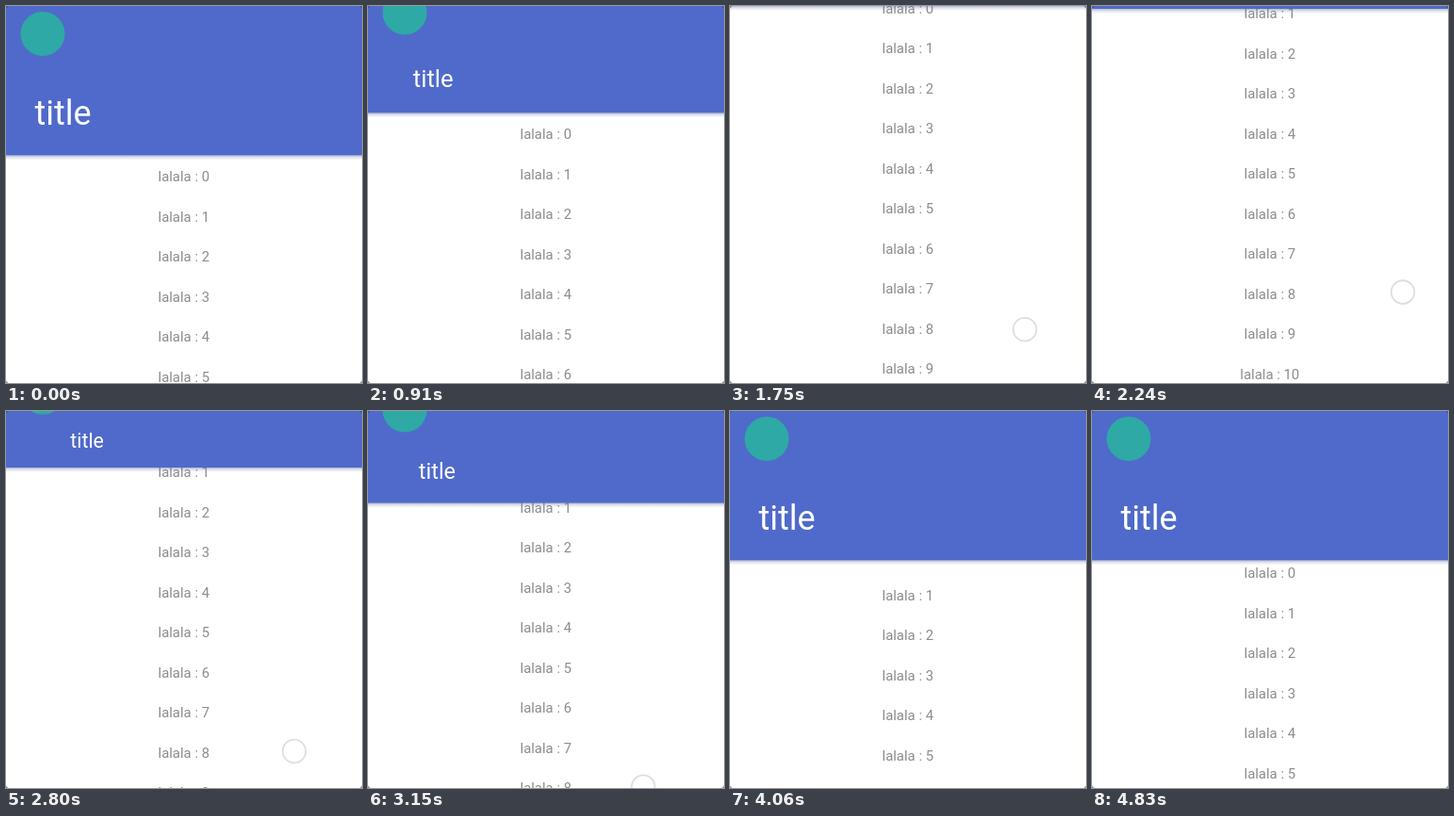
These frames come from a looping animation (378 by 400 pixels, 4970 ms). An HTML page:

```html
<!DOCTYPE html>
<html lang="en">
<head>
<meta charset="utf-8">
<title>Collapsing toolbar</title>
<style>
  html, body { margin: 0; width: 100%; height: 100%; overflow: hidden; background: #fff; }
  svg { display: block; width: 100vw; height: 100vh; }
  text { font-family: Roboto, sans-serif; }
  #list { fill: #8c8c8c; font-size: 14.9px; text-anchor: middle; }
  #title { fill: #fff; }
</style>
</head>
<body>
<svg viewBox="0 0 378 400">
  <defs>
    <linearGradient id="shade" x2="0" y2="1">
      <stop offset="0" stop-color="#5f6f9f" stop-opacity=".5"/>
      <stop offset=".4" stop-color="#5f6f9f" stop-opacity=".2"/>
      <stop offset="1" stop-color="#5f6f9f" stop-opacity="0"/>
    </linearGradient>
  </defs>
  <rect width="378" height="400" fill="#fff"/>
  <g id="list"></g>
  <g id="bar">
    <rect y="-200" width="378" height="200" fill="#4f6aca"/>
    <rect width="378" height="5" fill="url(#shade)"/>
  </g>
  <circle id="icon" cx="39" r="23.5" fill="#2ea9a6"/>
  <text id="title">title</text>
  <circle id="touch" r="12.3" fill="#fff" fill-opacity=".5" stroke="#dcdee5" stroke-width="1.8"/>
  <path d="M0 0h2.5L0 2.5zM378 0v2.5L375.500 0zM0 400v-2.500L2.500 400zM378 400h-2.500L378 397.500z" fill="#3d4660" opacity=".55"/>
</svg>
<script>
const LOOP = 4970, STEP = 70, TURN = 2170;
const OPEN = 158.5, CLOSED = 59.5, ROW = 42.5, ROWS = 12;
const $ = id => document.getElementById(id);
const mix = (a, b, k) => a + (b - a) * k;

// [time, centre of first row]
const scroll = [[700, 181], [770, 171], [910, 136], [1400, 63], [1820, -8],
  [2030, -34], [2100, -37.5], [2170, -37.5], [2240, -34.5], [2800, 22.5],
  [3500, 98], [3850, 134], [4200, 163], [4410, 172]];
const touchX = [[1400, 296], [2100, 330], [2240, 330], [2800, 306], [3300, 290]];
const touchGap = [[1400, 343], [2100, 338], [2800, 338.5]];

// Monotone cubic through the points, held at both ends
function curve(pts) {
  const n = pts.length - 1;
  const slope = i => (pts[i + 1][1] - pts[i][1]) / (pts[i + 1][0] - pts[i][0]);
  const tangent = i => {
    if (i === 0 || i === n) return 0;
    const a = slope(i - 1), b = slope(i);
    return a * b <= 0 ? 0 : 2 * a * b / (a + b);
  };
  return t => {
    if (t <= pts[0][0]) return pts[0][1];
    if (t >= pts[n][0]) return pts[n][1];
    const i = pts.findIndex(p => p[0] > t) - 1;
    const [t0, a] = pts[i], [t1, b] = pts[i + 1];
    const d = t1 - t0, k = (t - t0) / d, j = 1 - k;
    return a * (1 + 2 * k) * j * j + d * tangent(i) * k * j * j
      + b * k * k * (3 - 2 * k) - d * tangent(i + 1) * k * k * j;
  };
}

const listAt = curve(scroll), xAt = curve(touchX), gapAt = curve(touchGap);

const rows = Array.from({ length: ROWS }, (_, i) => {
  const row = document.createElementNS("http://www.w3.org/2000/svg", "text");
  row.textContent = "lalala : " + i;
  row.setAttribute("x", 188.8);
  $("list").append(row);
  return row;
});

function set(id, attrs) {
  for (const name in attrs) $(id).setAttribute(name, attrs[name]);
}

function draw(t) {
  const top = listAt(t);
  const h = t < TURN ? Math.max(0, top - 22.5) : Math.min(OPEN, top + 37.5);
  rows.forEach((row, i) => row.setAttribute("y", top + i * ROW + 5.2));
  set("bar", { transform: `translate(0 ${h})` });
  set("icon", { cy: 29.5 - (OPEN - h) / 2 });

  const k = Math.min(1, (OPEN - h) / (OPEN - CLOSED));
  const size = mix(36, 21.3, 1 - (1 - k) ** 2);
  const base = mix(125.5, 38.5, k) + Math.min(0, h - CLOSED);
  set("title", { x: mix(30.5, 68.5, k), y: base, "font-size": size, "font-weight": k < 1 ? 400 : 500 });

  set("touch", { cx: xAt(t), cy: top + gapAt(t) });
}

function tick(now) {
  draw(Math.floor(now % LOOP / STEP) * STEP);
  requestAnimationFrame(tick);
}
draw(0);
requestAnimationFrame(tick);
</script>
</body>
</html>
```
